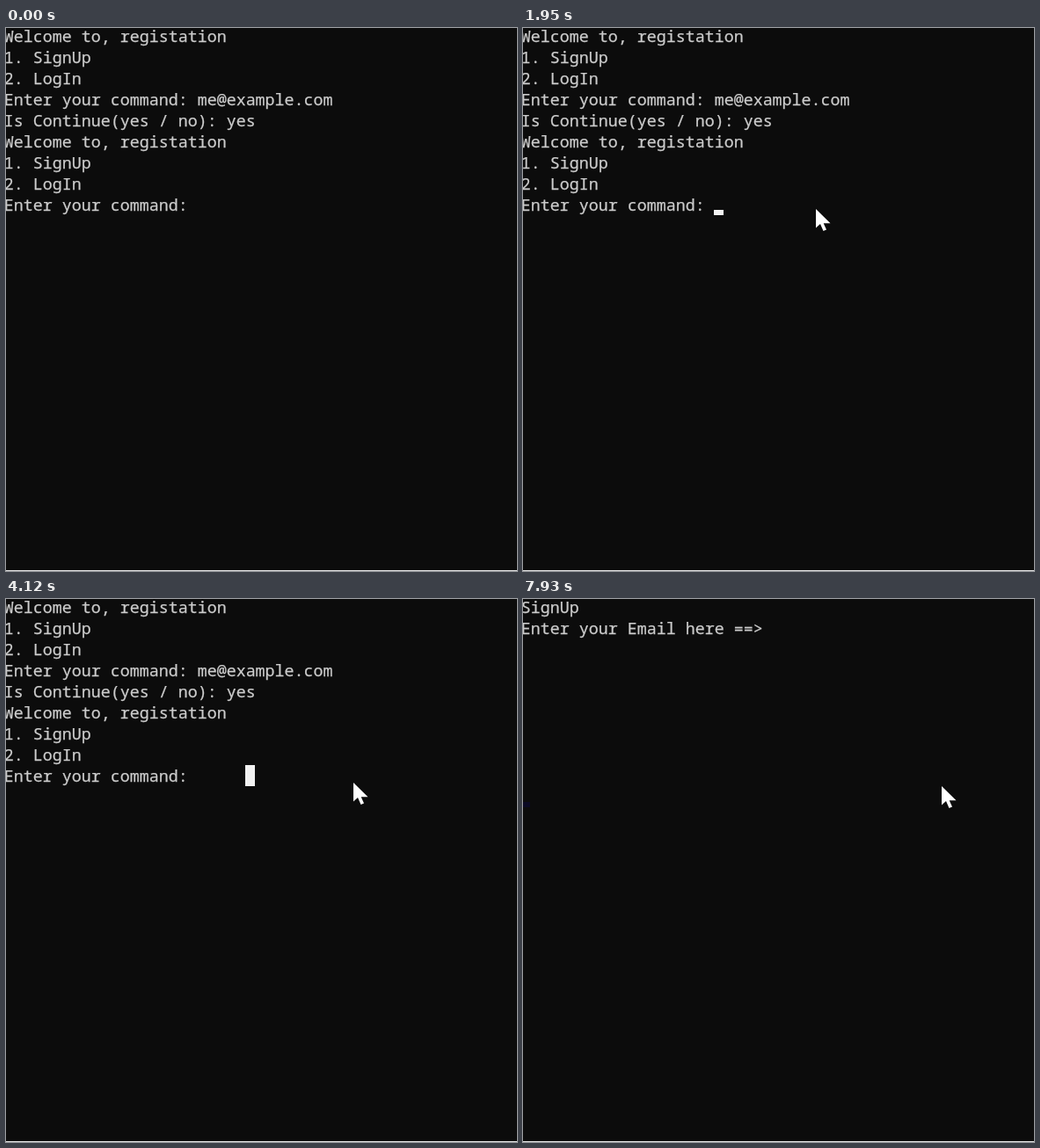
Recreate the animation shown at these times as an HTML page. Size 581 px wide and 618 px high, loop 8000 ms.

```html
<!DOCTYPE html>
<html lang="en">
<head>
<meta charset="utf-8">
<title>Console registration</title>
<style>
  html, body { margin: 0; width: 100%; height: 100%; overflow: hidden; background: #0c0c0c; }
  svg { display: block; }
  text {
    font: 18.333px "Noto Sans Mono", monospace; white-space: pre;
    fill: #ccc; stroke: #ccc; stroke-width: .25px;
  }
</style>
</head>
<body>
<svg width="581" height="618" viewBox="0 0 581 618">
  <rect width="581" height="618" fill="#0c0c0c"/>
  <rect y="617" width="581" height="1" fill="#e4e4e4"/>
  <g id="menu"></g>
  <g id="signup"><rect y="231" width="8" height="6" fill="#0b0a24"/></g>
  <rect id="block" width="11" height="24" fill="#f2f2f2"/>
  <rect id="caret" width="11" height="6" fill="#f2f2f2"/>
  <path id="mouse" d="M0 0V21.5L5 17L8.5 25L12 23.5L8.7 16.3H16.5Z" fill="#fff"/>
  <circle id="click" r="18" fill="#ff0" fill-opacity=".5"/>
</svg>
<script>
const LOOP = 8000, COL = 11, ROW = 24, BLINK = 530, STEP = 68;
const ENTER = 190, FOCUS = 1460, CLEAR = 4270, TYPE = 4400, SUBMIT = 5930, READY = 6060;
const CLICKS = [1010, 2100, 3000], CLICK_TIME = 200;

const el = id => document.getElementById(id);
const colX = col => col * COL - 3;
const rowY = row => row * ROW - 3;

function addLine(parent, row, string) {
  const text = document.createElementNS('http://www.w3.org/2000/svg', 'text');
  text.setAttribute('x', colX(0) + .7);
  text.setAttribute('y', rowY(row) + 19);
  text.textContent = string;
  return parent.appendChild(text);
}

const prompt = 'Enter your command: ';
const emailPrompt = 'Enter your Email here ==> ';
const welcome = ['Welcome to, registation', '1. SignUp', '2. LogIn'];
[...welcome, prompt + 'me@example.com', 'Is Continue(yes / no): yes', ...welcome]
  .forEach((line, row) => addLine(el('menu'), row, line));
const command = addLine(el('menu'), 8, prompt);
['SignUp', emailPrompt].forEach((line, row) => addLine(el('signup'), row, line));

const entry = { x: 518, y: 525 };
const moves = [
  { from: ENTER, to: 940, x: 340, y: 186 },
  { from: 1210, to: 2080, x: 332, y: 209 },
  { from: 2300, to: 2700, x: 279, y: 201 },
  { from: 2860, to: 2980, x: 276, y: 194 },
  { from: 3180, to: 3430, x: 253, y: 202 },
  { from: 3580, to: 4400, x: 476, y: 213 }
];

// The pointer eases from one resting place to the next.
function pointerAt(t) {
  let { x, y } = entry;
  for (const move of moves) {
    const k = Math.min(1, Math.max(0, (t - move.from) / (move.to - move.from)));
    const eased = k * k * (3 - 2 * k);
    x += (move.x - x) * eased;
    y += (move.y - y) * eased;
  }
  return { x: Math.round(x), y: Math.round(y) };
}

function show(id, visible, x, y) {
  el(id).style.display = visible ? '' : 'none';
  if (visible && x !== undefined) el(id).setAttribute('transform', `translate(${x} ${y})`);
}

function caretVisible(t) {
  if (t < FOCUS) return false;
  const start = t < CLEAR ? FOCUS : t < READY ? CLEAR : 6340;
  return t - start < BLINK || Math.floor((t - start) / BLINK) % 2 === 0;
}

function render(t) {
  const signup = t >= SUBMIT;
  const input = prompt + (t >= TYPE ? '1' : '');
  command.textContent = input;
  show('menu', !signup);
  show('signup', signup);
  show('caret', caretVisible(t),
    colX((signup ? emailPrompt : input).length), rowY(signup ? 1 : 8) + 18);

  const { x, y } = pointerAt(ENTER + Math.floor((t - ENTER) / STEP) * STEP);
  show('mouse', t >= ENTER, x, y);
  show('click', CLICKS.some(c => t >= c && t < c + CLICK_TIME), x - 1, y - 2);

  // The first click gives focus; later ones mark the cell under the pointer.
  const lastClick = CLICKS.filter(c => c <= t).pop();
  const cell = pointerAt(lastClick);
  show('block', lastClick > CLICKS[0] && t < CLEAR + STEP,
    colX(Math.floor((cell.x + 3) / COL)), rowY(Math.floor((cell.y + 3) / ROW)));
}

const start = performance.now();
function frame() {
  render((performance.now() - start) % LOOP);
  requestAnimationFrame(frame);
}
frame();
</script>
</body>
</html>
```
